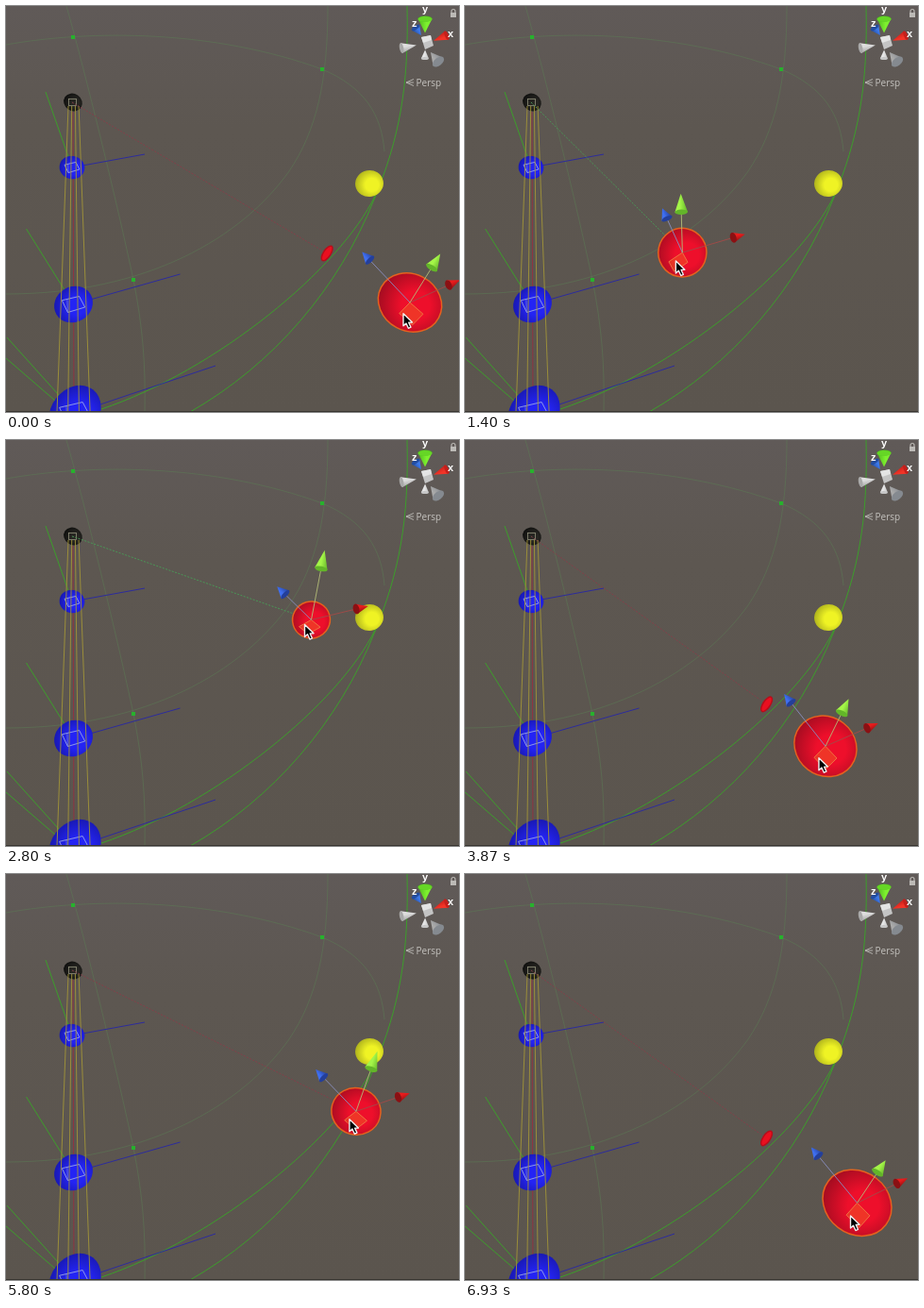
Recreate the animation shown at these times as an HTML page with a canvas. Size 480 by 430 pixels, loop 6990 ms.

```html
<!DOCTYPE html>
<html lang="en">
<head>
<meta charset="utf-8">
<title>Drag the target</title>
<style>
html, body { margin: 0; width: 100%; height: 100%; overflow: hidden; background: #5c564f; }
canvas { display: block; }
</style>
</head>
<body>
<canvas id="stage" width="480" height="430"></canvas>
<script>
const g = document.getElementById('stage').getContext('2d');
const LOOP = 6990, STEP = LOOP / 105, TAU = Math.PI * 2;
const ROOT = { x: 70, y: 102 };
const GREEN = '#3c9e2b';

// Where the drag turns: time, x, y
const TURNS = [
  [0, 428, 314], [330, 400, 385], [730, 272, 349], [1400, 230, 261], [1800, 77, 291],
  [2200, 262, 258], [2800, 324, 190], [3220, 395, 132], [3870, 381, 326], [4400, 268, 349],
  [4800, 217, 319], [5130, 226, 299], [5800, 372, 252], [6200, 362, 386], [6930, 416, 348]
];

// Smooth curve through the turns
function pose(t) {
  const last = TURNS.length - 1;
  let i = 0;
  while (i < last - 1 && TURNS[i + 1][0] <= t) i++;
  const a = TURNS[i], b = TURNS[i + 1], span = b[0] - a[0];
  const u = Math.min(1, (t - a[0]) / span), u2 = u * u, u3 = u2 * u;
  const slope = (k, c) => {
    const p = TURNS[Math.max(0, k - 1)], n = TURNS[Math.min(last, k + 1)];
    return (n[c] - p[c]) / (n[0] - p[0]) * span;
  };
  const at = c => (2 * u3 - 3 * u2 + 1) * a[c] + (u3 - 2 * u2 + u) * slope(i, c) +
    (3 * u2 - 2 * u3) * b[c] + (u3 - u2) * slope(i + 1, c);
  return { x: at(1), y: at(2) };
}

function path(points, color, width = 1, fill) {
  g.beginPath();
  for (let i = 0; i < points.length; i += 2) g.lineTo(points[i], points[i + 1]);
  if (fill) { g.closePath(); g.fillStyle = fill; g.fill(); }
  if (color) { g.strokeStyle = color; g.lineWidth = width; g.stroke(); }
}

function curve(d, color, width = 1) {
  g.strokeStyle = color;
  g.lineWidth = width;
  g.stroke(new Path2D(d));
}

function oval(x, y, rx, ry, turn, fill, edge) {
  g.beginPath();
  g.ellipse(x, y, rx, ry, turn, 0, TAU);
  g.fillStyle = fill;
  g.fill();
  if (edge) { g.strokeStyle = edge; g.lineWidth = 1.5; g.stroke(); }
}

// Perspective stretches a sphere away from the middle of the view
function sphere(x, y, r, light, dark, edge) {
  const dx = x - 240, dy = y - 215;
  const stretch = 1 + .15 * (dx * dx + dy * dy) / 215 ** 2;
  const shade = g.createRadialGradient(x + r * .2, y + r * .1, r * .5, x + r * .2, y + r * .1, r * 1.4);
  shade.addColorStop(0, light);
  shade.addColorStop(1, dark);
  oval(x, y, r * stretch, r, Math.atan2(dy, dx), shade, edge);
}

// A cone centred on x, y whose apex points along the angle
function cone(x, y, angle, length, half, light, dark, flat = .4) {
  g.save();
  g.translate(x, y);
  g.rotate(angle);
  const shade = g.createLinearGradient(0, -half, 0, half);
  shade.addColorStop(.4, light);
  shade.addColorStop(1, dark);
  path([length / 2, 0, -length / 2, half, -length / 2, -half], null, 0, shade);
  oval(-length / 2, 0, half * flat, half, 0, dark);
  g.restore();
}

function label(text, x, y, font, color) {
  g.font = font;
  g.fillStyle = color;
  g.fillText(text, x, y);
}

function background() {
  const shade = g.createLinearGradient(0, 0, 0, 430);
  shade.addColorStop(0, '#605a58');
  shade.addColorStop(.3, '#5d5751');
  shade.addColorStop(1, '#5b554e');
  g.fillStyle = shade;
  g.fillRect(0, 0, 480, 430);

  const faint = 'rgba(92,122,84,.55)';
  curve('M0 41C90 25 220 25 335 67C380 86 398 115 401 154', faint);
  curve('M0 305C150 305 250 245 300 175C329 132 341 80 341 0', faint);
  curve('M64 0C84 70 118 210 135 290C145 340 148 380 147 430', faint);

  curve('M425 0C427 85 417 140 390 205C353 298 283 380 195 430', GREEN);
  curve('M391 201C354 278 223 386 101 427', GREEN);
  path([0, 373, 66, 430], GREEN);
  g.fillStyle = '#27b12d';
  for (const [x, y] of [[71, 33], [335, 67], [135, 290]]) g.fillRect(x - 2, y - 2, 4, 4);
}

function wireBox(x, y, s) {
  path([x - s, y - s * .35, x + s * .5, y - s * .7, x + s, y + s * .25,
    x - s * .5, y + s * .7, x - s, y - s * .35], '#a9b5e6', .8);
  path([x - s * .55, y - s * .45, x - s * .5, y + s * .7], '#8c98d0', .6);
}

// Each joint is nearer to the camera than the one above it
function chain() {
  path([71, 112, 72, 430], '#963040', .9);
  for (let k = 0; k < 3; k++) {
    const x = 70 + k * 1.5, y = 171 + 160 * k - 15 * k * k, r = 12.2 + 6.5 * k;
    path([x, y, x - 28 - 22 * k, y - 80], GREEN);
    path([x, y, x + 77 + 36 * k, y - 14 - 18 * k], '#2d2c9c');
    sphere(x, y, r, '#2424f4', '#1717a8');
    wireBox(x, y, r * .65);
  }
  sphere(71, 102, 9, '#272622', '#0c0c0b');
  g.strokeStyle = '#91917b';
  g.lineWidth = .8;
  g.strokeRect(66.5, 98.5, 8, 7);
  for (let i = 0; i < 4; i++) path([66 + 3.7 * i, 106, 54 + 11.7 * i, 430], '#a29538', .9);
}

function sceneAxes() {
  cone(437, 27, .95, 10, 5, '#3d78e8', '#234da0');
  cone(427, 43, -.2, 16, 5.5, '#dedede', '#a9a9a9');
  cone(444, 51, -1.55, 9, 4, '#e6e6e6', '#c6c6c6');
  cone(454, 54, -2.25, 13, 7, '#aaa', '#858a90', .6);
  cone(460, 34, 2.75, 15, 5, '#f23427', '#c4201c');
  path([440, 33, 450, 31, 453, 42, 444, 46], null, 0, '#c4c4c4');
  path([440, 33, 450, 31, 451, 36, 442, 39], null, 0, '#e4e4e4');
  cone(444, 21, 1.57, 15, 7.5, '#7df02e', '#4db51f');
  oval(444, 14, 7.5, 3, 0, '#66d626');
  const bold = 'bold 11px "Liberation Sans", Arial, sans-serif';
  label('y', 441, 7, bold, '#fff');
  label('z', 430, 22, bold, '#fff');
  label('x', 468, 33, bold, '#fff');

  const grey = '#bcbab6';
  g.fillStyle = grey;
  g.fillRect(471, 7, 6, 5);
  curve('M472 7V5.5A2 2 0 0 1 476 5.5V7', grey, 1.2);
  curve('M432 77.5L424 81L432 84.5M424 81H432', grey, .9);
  label('Persp', 434.5, 85, '10px "Open Sans", "Noto Sans", sans-serif', '#c4c2be');
}

// The line ends in a disc where the ball lies out of reach
function reachLine({ x, y }) {
  const dx = x - ROOT.x, dy = y - ROOT.y, angle = Math.atan2(dy, dx);
  const reach = 361 - 88 * angle, part = Math.min(1, reach / Math.hypot(dx, dy));
  const endX = ROOT.x + dx * part, endY = ROOT.y + dy * part;
  g.setLineDash([2, 1.5]);
  path([ROOT.x, ROOT.y, endX, endY], part < 1 ? '#84404a' : '#4a9656');
  g.setLineDash([]);
  if (part < 1) oval(endX, endY, 9, 3.8, -.98, '#ea1020', '#b80d1a');
}

function target({ x, y }) {
  sphere(x, y, .086 * y + 3.1, '#ee0f2b', '#a00c20', '#e5611f');

  const up = [.147 * (x - 240), -64 + .16 * (y - 190)];
  const away = [-17 - .14 * (x - 217), -31 - .146 * (y - 190)];
  const side = [61 - .067 * (x - 217), -13 - .065 * (y - 190)];
  const shaft = (v, color) => path([x, y, x + v[0], y + v[1]], color, .9);
  const tip = (v, ...look) => cone(x + v[0], y + v[1], Math.atan2(v[1], v[0]), ...look);

  const ux = side[0] * -.24, uy = side[1] * -.55, vx = away[0] * -.3, vy = away[1] * -.25;
  path([x, y, x + ux, y + uy, x + ux + vx, y + uy + vy, x + vx, y + vy, x, y],
    '#f07a45', .9, 'rgba(240,90,35,.5)');
  shaft(away, '#8a8fc0');
  shaft(side, '#a34a48');
  shaft(up, '#b4bd78');
  tip(away, 12, 6, '#3f6ff0', '#243f9a');
  tip(side, 13, 5.5, '#e81c1c', '#8b1013', .6);
  tip(up, 20 - Math.max(0, y - 250) * .045, 6.8, '#a4f548', '#63b529');
}

function pointer(x, y) {
  g.save();
  g.translate(x, y);
  g.lineJoin = 'round';
  path([0, 0, 0, 13, 3, 10.3, 5.4, 15.5, 8, 14.4, 5.7, 9.4, 9.5, 9.2, 0, 0], '#eee', 1.4, '#000');
  g.restore();
}

function draw(now) {
  const t = Math.floor((now % LOOP) / STEP + .02) * STEP;
  const ball = pose(t);
  background();
  chain();
  reachLine(ball);
  sphere(385, 188, 14, '#eff324', '#a4a81c');
  target(ball);
  sceneAxes();
  path([0, 429.5, 480, 429.5], '#383631');
  pointer(ball.x - 7, ball.y + 5 + (ball.y - 190) * .055);
}

let start;
function tick(now) {
  start ??= now;
  draw(now - start);
  requestAnimationFrame(tick);
}
requestAnimationFrame(tick);
</script>
</body>
</html>
```
